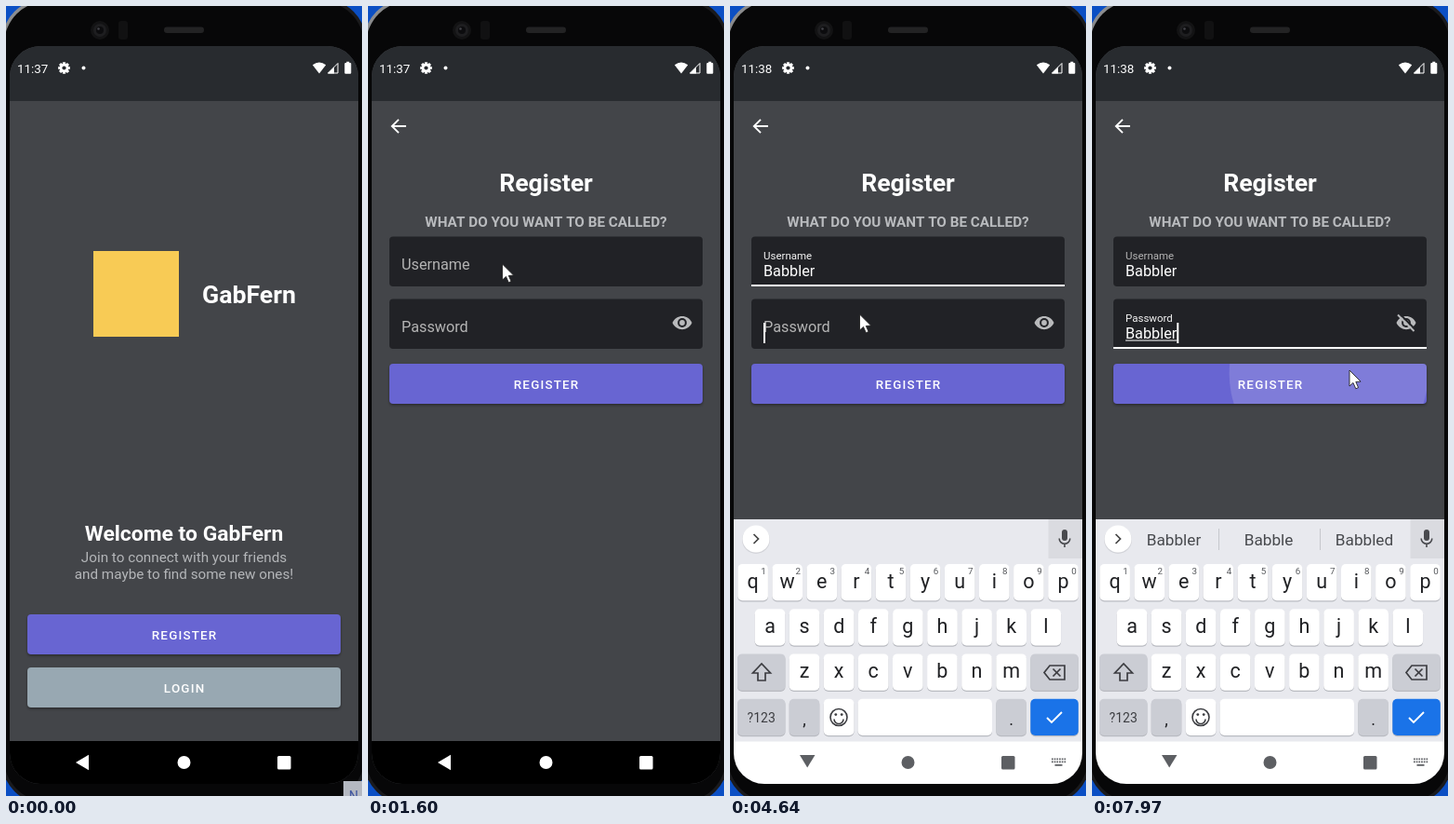
Animation, 383 px wide and 848 px high, one loop 8 s. Source, as an HTML page with a canvas:

```html
<!DOCTYPE html>
<html lang="en">
<head>
<meta charset="utf-8">
<title>Sign-up flow</title>
<style>
html, body { margin: 0; width: 100%; height: 100%; overflow: hidden; background: #0b4fc4; }
canvas { display: block; width: 383px; height: 848px; }
</style>
</head>
<body>
<canvas id="stage" width="383" height="848"></canvas>
<script>
const ctx = document.getElementById('stage').getContext('2d');
const LOOP = 8000, MID = 191.5, APP = 'GabFern', USER = 'Babbler';
const GREY = '#b4b6b9', PURPLE = '#6865d2', PANEL = '#434549', FIELD = '#212226', INK = '#202124';
const INPUT_SIZE = 16.25, LABEL_SIZE = 11.5;
const KEY_ROWS = ['qwertyuiop', 'asdfghjkl', 'zxcvbnm'];
const PASS_TIMES = [5180, 5350, 5490, 5630, 5800, 5950, 6050];
const NAME_TIMES = Array.from(USER, (_, i) => 2660 + 140 * i);

// Pointer stops: time, x, y
const POINTER = [
  [30, 380, 846], [300, 284, 750], [560, 166, 630], [820, 205, 668], [940, 205, 668],
  [1220, 99, 355], [1300, 99, 355], [1600, 144.5, 277], [1660, 144.5, 277], [1770, 152.5, 271],
  [4040, 152.5, 271], [4400, 139.5, 331], [6700, 139.5, 331], [7260, 334, 335],
  [7540, 334, 335], [7800, 277, 391]
];

const clamp = v => Math.max(0, Math.min(1, v));
const ramp = (t, a, b) => clamp((t - a) / (b - a));
const ease = p => p * p * (3 - 2 * p);
const lerp = (a, b, p) => a + (b - a) * p;
const typed = (times, t) => times.filter(at => t >= at).length;

function box(x, y, w, h, r, fill) {
  ctx.beginPath();
  ctx.roundRect(x, y, w, h, r);
  if (fill) { ctx.fillStyle = fill; ctx.fill(); }
}
function disc(x, y, r, fill) {
  ctx.beginPath();
  ctx.arc(x, y, r, 0, Math.PI * 2);
  ctx.fillStyle = fill;
  ctx.fill();
}
function poly(points, fill) {
  ctx.beginPath();
  points.forEach(([x, y]) => ctx.lineTo(x, y));
  ctx.closePath();
  ctx.fillStyle = fill;
  ctx.fill();
}
function line(points, color, width) {
  ctx.beginPath();
  points.forEach(([x, y], i) => i ? ctx.lineTo(x, y) : ctx.moveTo(x, y));
  ctx.strokeStyle = color;
  ctx.lineWidth = width;
  ctx.stroke();
}
function text(s, x, y, size, color, { weight = 400, align = 'left', spacing = 0 } = {}) {
  ctx.font = `${weight} ${size}px Roboto, sans-serif`;
  ctx.letterSpacing = spacing + 'px';
  ctx.textAlign = align;
  ctx.fillStyle = color;
  ctx.fillText(s, x, y);
  return ctx.measureText(s).width;
}
const centered = (s, y, size, color, weight) => text(s, MID, y, size, color, { weight, align: 'center' });

function button(label, y, color, ripple) {
  ctx.save();
  ctx.shadowColor = 'rgba(0,0,0,.4)';
  ctx.shadowBlur = 3;
  ctx.shadowOffsetY = 1.5;
  box(23, y, 337, 43, 4, color);
  ctx.restore();
  if (ripple && ripple.age > 0 && ripple.alpha > 0) {
    const p = clamp(ripple.age / 500);
    ctx.save();
    box(23, y, 337, 43, 4);
    ctx.clip();
    disc(lerp(ripple.x, MID, p), lerp(ripple.y, y + 21, p), 10 + .74 * ripple.age, `rgba(255,255,255,${ripple.alpha})`);
    ctx.restore();
  }
  text(label, MID + .6, y + 27, 13.4, '#fff', { weight: 500, align: 'center', spacing: 1.2 });
}

function welcome(t) {
  box(94, 263, 92, 92, 0, '#f8cb55');
  text(APP, 211, 319, 26.7, '#fff', { weight: 700 });
  centered('Welcome to ' + APP, 574, 22.9, '#fff', 700);
  centered('Join to connect with your friends', 597, 15.25, GREY);
  centered('and maybe to find some new ones!', 615, 15.25, GREY);
  button('REGISTER', 653, PURPLE, { x: 205, y: 668, age: t - 870, alpha: .15 * (1 - ramp(t, 1100, 1360)) });
  button('LOGIN', 710, '#98a8b2');
}

function field(label, y, lift, focus, clickX) {
  box(23, y, 337, 53.5, 4, FIELD);
  if (focus > 0) {
    const left = lerp(clickX, 23, focus), right = lerp(clickX, 360, focus);
    box(left, y + 51.5, right - left, 2, 0, '#fff');
  }
  const shade = Math.round(lerp(180, 245, lift ? focus : 0));
  text(label, 36, y + lerp(35, 24, lift), lerp(INPUT_SIZE, LABEL_SIZE, lift), `rgb(${shade},${shade},${shade})`);
}

function entry(s, y, underlined, caret) {
  const w = text(s, 36, y + 42.5, INPUT_SIZE, '#fff');
  if (underlined) box(36, y + 44, w * underlined / s.length, 1, 0, '#fff');
  if (caret) box(36 + w, y + 25.5, 2, 22, 0, '#fff');
}

function eye(x, y, off) {
  ctx.beginPath();
  ctx.moveTo(x - 10.5, y);
  ctx.bezierCurveTo(x - 6.5, y - 9.5, x + 6.5, y - 9.5, x + 10.5, y);
  ctx.bezierCurveTo(x + 6.5, y + 9.5, x - 6.5, y + 9.5, x - 10.5, y);
  ctx.fillStyle = '#b9babc';
  ctx.fill();
  disc(x, y, 4.9, FIELD);
  disc(x, y, 2.9, '#b9babc');
  if (off) {
    line([[x - 7, y - 9.5], [x + 10.5, y + 8]], FIELD, 2.2);
    line([[x - 9, y - 8.5], [x + 8.5, y + 9]], '#b9babc', 1.9);
  }
}

function register(t) {
  line([[41, 129], [26, 129]], '#fff', 1.9);
  line([[33, 121.8], [25.8, 129], [33, 136.2]], '#fff', 1.9);
  centered('Register', 199, 26.7, '#fff', 700);
  centered('WHAT DO YOU WANT TO BE CALLED?', 237, 15.25, '#b9bbbe', 700);

  const nameLift = ease(ramp(t, 1910, 2080)), passLift = ease(ramp(t, 4800, 4970));
  field('Username', 247.5, nameLift, t < 4800 ? nameLift : 1 - ease(ramp(t, 4800, 4900)), 150);
  field('Password', 314.5, passLift, passLift, 140);

  const nameLen = typed(NAME_TIMES, t);
  const nameCaret = t >= 2080 && t < 4020 && (nameLen > 0 || (t - 2080) % 1000 < 500);
  const composed = t > 3000 && t < 4560 ? typed(NAME_TIMES, t - 190) : 0;
  entry(USER.slice(0, nameLen), 247.5, composed, nameCaret);

  const passLen = typed(PASS_TIMES, t), shown = t >= 7410;
  const tail = t < 6720 && passLen ? 1 : 0;
  const secret = shown ? USER : '•'.repeat(passLen - tail) + USER.slice(passLen - tail, passLen);
  const lastKey = t >= 7540 ? 7540 : passLen ? PASS_TIMES[passLen - 1] : 4560;
  entry(secret, 314.5, t >= 7600 ? USER.length : 0, t >= 4560 && (t - lastKey) % 1020 < 509);

  eye(338, 340, shown);
  const press = ramp(t, 7380, 7480) * (1 - ramp(t, 7560, 7760));
  if (press > 0) disc(338, 340, 21, `rgba(255,255,255,${.1 * press})`);
  button('REGISTER', 384, PURPLE, { x: 277, y: 391, age: t - 7840, alpha: .15 });
}

function key(x, y, w, fill) {
  box(x, y + 1, w, 39.5, 5, '#b9bbc1');
  box(x, y, w, 39.3, 5, fill);
}

function suggestions(t) {
  disc(28, 573, 15, '#d3d4d9');
  disc(28, 572, 14.5, '#fff');
  line([[25.5, 567], [30.5, 572], [25.5, 577]], '#444', 1.7);
  box(342.5, 551, 37, 42, 0, '#dadbe0');
  box(357, 562, 6, 12, 3, '#48494d');
  ctx.beginPath();
  ctx.arc(360, 571.5, 5.8, 0, Math.PI);
  ctx.strokeStyle = '#48494d';
  ctx.lineWidth = 1.6;
  ctx.stroke();
  line([[360, 577], [360, 581]], '#48494d', 1.6);

  const known = t < 4560 ? typed(NAME_TIMES, t - 190) : t >= 7600 ? USER.length : 0;
  if (!known) return;
  [USER.slice(0, known), 'Babble', 'Babbled'].forEach((word, i) =>
    text(word, [88, 190, 293][i], 579, 17.2, '#47494d', { align: 'center' }));
  for (const x of [136.5, 245.5]) line([[x, 561], [x, 584]], '#c6c8cd', 1);
}

function keyboard(t) {
  const numeric = t >= 4970 && t < 7600;
  box(4, 551, 375, 239, 0, '#e8e9ee');
  box(4, 789.5, 375, 46, 0, '#fff');
  if (!numeric) suggestions(t);
  KEY_ROWS.forEach((row, r) => [...row].forEach((ch, i) => {
    const cx = [24.6, 43, 80][r] + 37.1 * i, y = 599 + 48.2 * r;
    const held = numeric && ch === 'q';
    if (held) box(cx - 17, y - 1, 35, 48, 4, '#dcdde0');
    key(cx - 16.3, y, 32.6, held ? '#ededee' : '#fff');
    text(ch, cx, y + 26, 21.5, INK, { align: 'center' });
    if (r) return;
    const digit = String((i + 1) % 10);
    if (numeric) text(digit, cx, 581, 21.5, INK, { align: 'center' });
    else text(digit, cx + 11.5, 610, 9.8, '#55575b', { align: 'center' });
  }));

  const gray = '#cbcdd4';
  key(8, 695.4, 51.5, gray);
  key(323.3, 695.4, 51.5, gray);
  line([[34, 706], [24.5, 716], [30, 716], [30, 724], [38, 724], [38, 716], [43.5, 716], [34, 706], [31, 709]], '#3c3d41', 1.7);
  line([[338, 715.5], [344, 708], [360, 708], [360, 723], [344, 723], [338, 715.5], [340, 713]], '#3c3d41', 1.7);
  line([[347.5, 711.5], [355.5, 719.5]], '#3c3d41', 1.7);
  line([[355.5, 711.5], [347.5, 719.5]], '#3c3d41', 1.7);

  const y = 743.7;
  key(8, y, 51.5, gray);
  text('?123', 33.7, 769, 14, '#3c3d41', { align: 'center' });
  key(63.7, y, 32.6, gray);
  text(',', 80, 772, 18, INK, { align: 'center' });
  key(286.3, y, 32.6, gray);
  text('.', 302.6, 772, 18, INK, { align: 'center' });
  const spaceX = numeric ? 100.8 : 137.5;
  key(spaceX, y, 282 - spaceX, '#fff');
  if (!numeric) {
    key(100.8, y, 32.6, '#fff');
    ctx.beginPath();
    ctx.arc(117, 763.5, 9, 0, Math.PI * 2);
    ctx.moveTo(122, 765.5);
    ctx.arc(117, 765.5, 5, 0, Math.PI);
    ctx.strokeStyle = '#3c3d41';
    ctx.lineWidth = 1.6;
    ctx.stroke();
    disc(113.8, 760.6, 1.4, '#3c3d41');
    disc(120.2, 760.6, 1.4, '#3c3d41');
  }
  key(323.3, y, 51.5, '#1a73e8');
  line([[341, 764], [346, 769], [357, 758]], '#fff', 1.9);
}

function navBar(t, up) {
  const color = up > .25 ? '#5d5f63' : '#fff';
  const typing = t >= 2600;
  poly(typing ? [[75, 804], [91.5, 804], [83.2, 817.5]] : [[75, 812], [89, 803.8], [89, 820.2]], color);
  disc(MID, 812, 7, color);
  box(292, 805, 14.5, 14.5, 1.5, color);
  if (!typing) return;
  for (let r = 0; r < 2; r++)
    for (let i = 0; i < 6; i++) box(346 + 2.7 * i, 807.5 + 3 * r, 1.7, 1.7, 0, color);
  box(349.5, 814, 8, 1.7, 0, color);
}

function statusBar(t) {
  box(4, 43, 375, 59, 0, '#282b2f');
  text(t < 4060 ? '11:37' : '11:38', 12, 72, 13.4, '#fff');
  for (let i = 0; i < 8; i++) {
    ctx.save();
    ctx.translate(62.5, 66.5);
    ctx.rotate(i * Math.PI / 4);
    box(-1.6, -6.3, 3.2, 3, .5, '#fff');
    ctx.restore();
  }
  disc(62.5, 66.5, 4.7, '#fff');
  disc(62.5, 66.5, 2.1, '#282b2f');
  disc(83.5, 66.5, 2, '#fff');
  ctx.beginPath();
  ctx.moveTo(337, 72.5);
  ctx.lineTo(329.8, 63.3);
  ctx.quadraticCurveTo(337, 57.5, 344.2, 63.3);
  ctx.fillStyle = '#fff';
  ctx.fill();
  line([[346.5, 72], [357, 72], [357, 61.5], [346.5, 72]], '#fff', 1);
  poly([[346, 72.5], [353, 72.5], [353, 65.5]], '#fff');
  box(364.3, 61, 7, 11.7, 1, '#fff');
  box(366.3, 59.8, 3, 2, 0, '#fff');
}

function phoneBody() {
  box(0, 0, 383, 848, 0, '#0b4fc4');
  const rim = ctx.createLinearGradient(0, 0, 60, 60);
  rim.addColorStop(0, '#9a9b9d');
  rim.addColorStop(.5, '#6a6b6d');
  rim.addColorStop(1, '#1a1a1c');
  box(-5, -8, 393, 865, 48, rim);
  box(-2, -5, 387, 859, 46, '#070708');
  disc(101, 26, 10, '#131314');
  disc(101, 26, 7, '#1e1e20');
  disc(101, 26, 4, '#0c0c0e');
  disc(99.5, 24.5, 1.3, '#44454a');
  box(121, 16, 10, 20, 3, '#111112');
  box(170, 22.5, 43, 6.5, 3.2, '#232324');
}

function screenLayer(draw, t, scale, alpha) {
  if (alpha <= 0) return;
  ctx.save();
  ctx.globalAlpha = alpha;
  ctx.translate(MID, 445);
  ctx.scale(scale, scale);
  ctx.translate(-MID, -445);
  draw(t);
  ctx.restore();
}

function pointer(t) {
  if (t < POINTER[0][0]) return;
  let i = POINTER.findIndex(stop => stop[0] > t);
  if (i < 0) i = POINTER.length;
  const a = POINTER[i - 1], b = POINTER[i] || a;
  const p = a === b ? 0 : ease(ramp(t, a[0], b[0]));
  ctx.save();
  ctx.translate(lerp(a[1], b[1], p), lerp(a[2], b[2], p));
  ctx.scale(1.1, 1.1);
  poly([[0, 0], [0, 15.5], [3.6, 12.2], [6.2, 18], [8.7, 16.9], [6.2, 11.3], [11, 11]], '#fff');
  ctx.strokeStyle = '#222';
  ctx.lineWidth = .8;
  ctx.stroke();
  ctx.restore();
}

function render(t) {
  phoneBody();
  ctx.save();
  box(4, 43, 375, 792, 33, PANEL);
  ctx.clip();
  ctx.save();
  ctx.beginPath();
  ctx.rect(4, 102, 375, 687);
  ctx.clip();
  screenLayer(welcome, t, 1 + .1 * ramp(t, 1120, 1320), 1 - ramp(t, 1240, 1330));
  screenLayer(register, t, lerp(.85, 1, ease(ramp(t, 1290, 1560))), ramp(t, 1290, 1440));
  ctx.restore();
  statusBar(t);
  box(4, 789, 375, 46, 0, '#000');
  const up = ease(ramp(t, 2740, 3000));
  if (up > 0) {
    ctx.save();
    ctx.translate(0, (1 - up) * 284);
    keyboard(t);
    ctx.restore();
  }
  navBar(t, up);
  ctx.restore();
  if (t < 30) {
    box(363, 832, 20, 16, 0, '#b4b8c1');
    text('N', 369, 853, 14, '#3c539f');
  }
  pointer(t);
}

const start = performance.now();
function tick() {
  render((performance.now() - start) % LOOP);
  requestAnimationFrame(tick);
}
tick();
</script>
</body>
</html>
```
